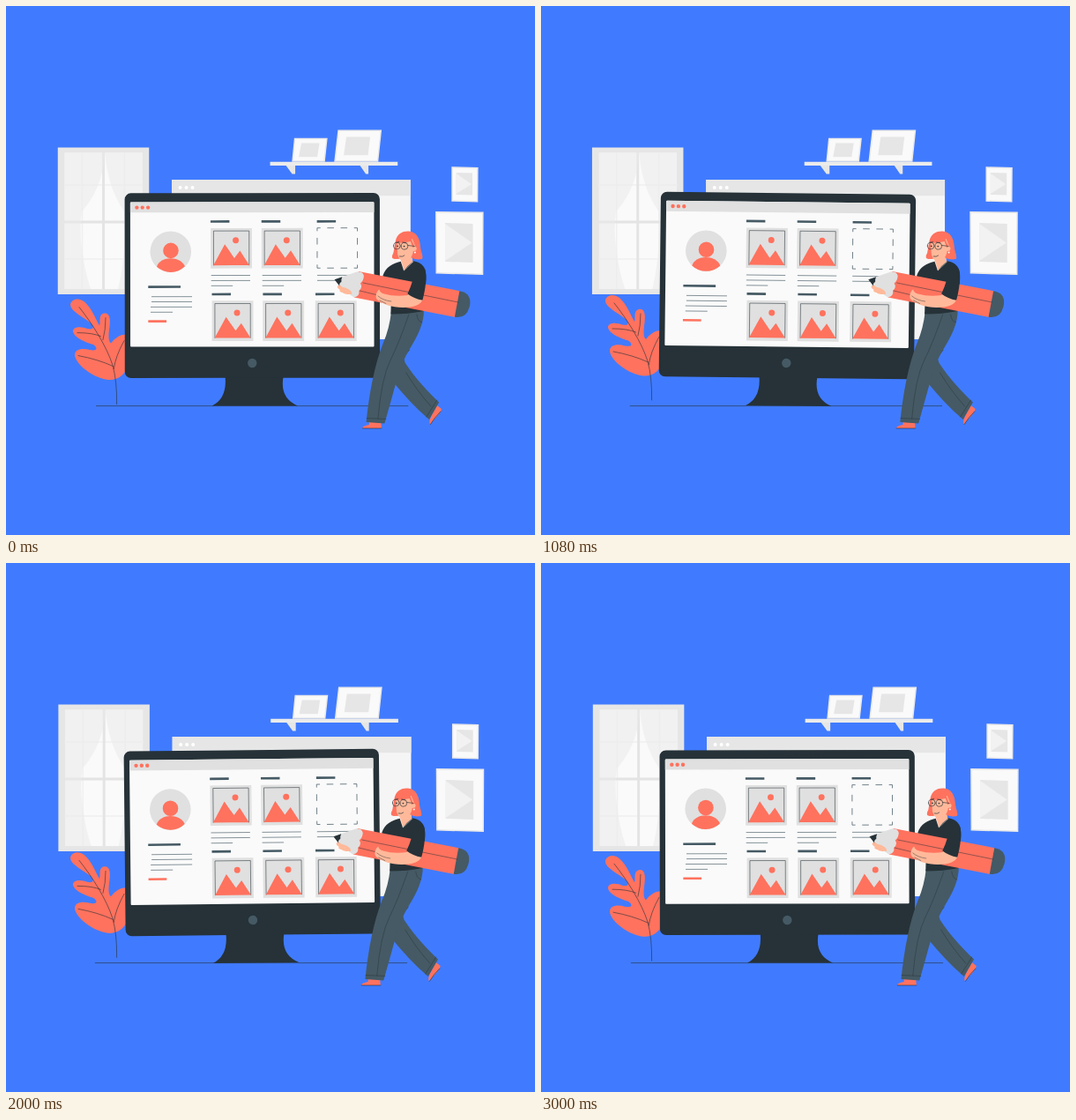
These frames come from a looping animation (600x600 px, 3.04 s). An HTML page:

```html
<!DOCTYPE html>
<html lang="en">
<head>
<meta charset="utf-8">
<title>Designer at work</title>
<style>
html, body { margin: 0; width: 100%; height: 100%; overflow: hidden; background: #407bff; }
svg { display: block; width: 100vw; height: 100vh; }
.coral { fill: #ff725e; }
.dark { fill: #263238; }
.slate { fill: #455a64; }
.skin { fill: #ffb99a; }
.white { fill: #fafafa; }
.pale { fill: #f2f2f2; }
.grey { fill: #e6e6e6; }
.mid { fill: #e0e0e0; }
.line { fill: none; stroke: #263238; stroke-width: .6; stroke-linecap: round; stroke-linejoin: round; }
.frame { fill: #fafafa; stroke: #e8e8e8; stroke-width: 1.5; }
</style>
</head>
<body>
<svg viewBox="0 0 600 600">
  <defs>
    <g id="card">
      <path class="mid" d="M0 0H46.8V45.7H0Z"/>
      <path class="line" style="stroke-width:.55" d="M3.3 42V3.2H43.6V42"/>
      <path class="coral" d="M3 42.2 16 18.3 26.8 34 33.2 25.5 43.8 42.2Z"/>
      <circle class="coral" cx="28.4" cy="13.8" r="3.5"/>
    </g>
  </defs>

  <g id="room">
    <path class="grey" d="M58.7 160.6H162.2V327H58.7Z"/>
    <path class="white" d="M66.5 166.5H154.5V321H66.5Z"/>
    <path d="M86.5 166V321M134.5 166V321M66 203H155M66 287H155" stroke="#f0f0f0" stroke-width="1.5"/>
    <path d="M110.5 166V321M66 245H155" stroke="#e4e4e4" stroke-width="3"/>
    <path d="M66.5 166.5H112C111 193 101 217 86 233Q83 250 86 275T96 321H66.5ZM112 166.5H154.5V321H127Q137 280 134 233C121 214 114 192 112 166.5Z" fill="#ececec" opacity=".55"/>

    <path class="grey" d="M317.5 181H328V190.5H324.5ZM401.5 181H411V190.5H408Z"/>
    <path d="M299.5 176.7H444.2V181H299.5Z" fill="#ebebeb"/>
    <path class="frame" d="M327.5 150.6H363.8L361 176H325ZM377 141.2H425.2L421.5 176H373Z"/>
    <path class="grey" d="M335 155.5H355.5L353 171.2H332ZM386 148.5H413L410.5 169.3H383Z"/>

    <path class="frame" d="M506 183 534.8 183.8 534.5 221.8 506 221ZM487.8 233.8 540.8 234.2 540.5 304.3 488.2 302.8Z"/>
    <path class="grey" d="M510.5 189 529 189.6V214.5L510.5 214ZM498 246 529.5 247V291L498 290Z"/>
    <path class="pale" d="M510.5 190 528 202 510.5 213ZM498 247 528.5 268.5 498 289Z"/>

    <path d="M188 197H458.8V378H188Z" fill="#f5f5f5"/>
    <path class="grey" d="M188 197H458.8V215.3H188Z"/>
    <path d="M197.5 206h0M204.5 206h0M211.5 206h0" stroke="#fff" stroke-width="4" stroke-linecap="round"/>
  </g>

  <path id="ground" class="line" d="M102.5 453.6H456"/>

  <g id="leaf">
    <path class="coral" d="M73 339C74 333 82 330.5 89 336C98 344 101 355 106 363C108 360 104 351 111 349C118 348 118.5 356 117.5 364C116 374 116 381 119 383C123 378 128 373 137 373L140 405C136 418 128 425 116 424.5C100 423 80 408 78 397C77.5 389 87 388 95 390.5C103 392 105 389 99 384.5C90 382 76 376 76 369C77 363.5 86 364 92 366.5C99 368 101 365 96 360C88 353 73 347 73 339Z"/>
    <path class="line" d="M83 342C98 361 114 386 121 408Q126 426 125.6 452M81 371Q98 371 107.5 375M113 354Q113 368 110 379M82 397Q104 401 121.5 409M134 380Q124 398 122.3 412"/>
  </g>

  <g id="monitor">
    <path class="dark" d="M248.5 420Q251 445 233.5 453.5H331Q310 445 314.5 420Z"/>
    <rect class="dark" x="134.7" y="212.2" width="289.3" height="209.6" rx="7"/>
    <rect class="white" x="141" y="222.3" width="276.5" height="164.2" rx="1"/>
    <path class="mid" d="M141 234.2V223.3Q141 222.3 142 222.3H416.5Q417.5 222.3 417.5 223.3V234.2Z"/>
    <path d="M148.5 228.5h0M154.8 228.5h0M161.2 228.5h0" stroke="#ff725e" stroke-width="4.4" stroke-linecap="round"/>
    <circle class="slate" cx="279.2" cy="405" r="5.2"/>

    <circle class="mid" cx="186.8" cy="278.7" r="23.3"/>
    <circle class="coral" cx="187" cy="277.3" r="8.8"/>
    <path class="coral" d="M171 295.6C175 283 198 283 203 295.3A23.3 23.3 0 0 1 171 295.6Z"/>
    <path d="M161.3 318.5h36.7M232 244.4h21.5M289.8 244.4h21.5M352.7 244.4h21.5M233.5 326.9h21.5M291.4 326.9h21.5M351 326.9h21.5" stroke="#455a64" stroke-width="2.6"/>
    <path d="M161.3 357.5h20.7" stroke="#ff725e" stroke-width="2.6"/>
    <path d="M165 329.6h46M165 335.4h46M164 341.3h47M164 347.2h25M232.7 305.5h44.3M232.7 311.4h44.3M232.7 317.3h24.5M290.7 305.5h44.3M290.7 311.4h44.3M290.7 317.3h24.5M353 305.5h44M353 311.4h44" stroke="#455a64" stroke-width=".65"/>
    <path d="M353 251.8H398.6V297.3H353Z" fill="none" stroke="#455a64" stroke-width=".75" stroke-dasharray="3.8 7.6 7.6 7.6 7.6 7.6 3.8 0"/>
    <use href="#card" x="232.2" y="251.9"/>
    <use href="#card" x="289.9" y="251.9"/>
    <use href="#card" x="233.6" y="334.3"/>
    <use href="#card" x="291.3" y="334.3"/>
    <use href="#card" x="350.8" y="334.3"/>
  </g>

  <g id="person">
    <path class="coral" d="M489 453 494 457C493 463 486 467 481.5 474.5Q479 473 482.5 465ZM412 472H425.5L426 479H404.5Q404 476.5 412 475Z"/>
    <path class="line" d="M404.5 479H426M481.5 474.5Q486 467 493 460"/>
    <path class="slate" d="M444 378 453 405C464 422 479 438 491.3 449.5L480 469C465 456 451 441 438 425Z"/>
    <path d="M458 390 446 405 440 427 437 424 444 385Z" fill="#2f3f48"/>
    <path class="slate" d="M437 347 474 344C474.5 360 467 374 458 389C446 408 441 435 429.5 473.5L408.7 472C412 440 418 407 428 382Q435 366 437 347Z"/>
    <path class="line" style="stroke-width:.45" d="M457 350Q446 382 436 402T422 468M409.3 467.5 431 468.5M454 416Q466 436 482 454M477 466 489 447M466 350Q467 358 472 359"/>

    <path class="dark" d="M449 289.5C438 292 431 296 427.5 306L437 330 436.5 349.5Q456 349.5 474 346L473 332C476 321 478 306 475.5 299C473 292 467 290 461 289Z"/>
    <path class="skin" d="M448 283 460 279 461.5 290Q456 294 451.5 300L448 290Z"/>
    <path class="line" style="stroke:#fafafa;stroke-width:.5" d="M448.5 290 451.5 300 462 290"/>
    <path class="coral" d="M442 266C444 258 450 255 457 255.5C466 256 469.5 264 470 272C470.4 279 474 284 472 287Q464 288.5 459 285L441 287Q436 286 439.5 280Z"/>
    <path class="skin" d="M444 266Q454 269 461 264L464.5 273Q467 274 465 277.5L462 278C461 285 457 290 451 289.5C444 288 442.5 279 444 266Z"/>
    <path class="coral" d="M442.5 269C443 260 450 257 458 260L463.5 273 461.5 274 459 267Q451 269 442.5 269ZM444 276Q443 283 446 287L438 286Z"/>
    <path class="line" style="stroke-width:.65" d="M439.7 272a3.8 3.8 0 1 0 7.6 0a3.8 3.8 0 1 0-7.6 0M448.2 272.3a3.9 3.9 0 1 0 7.8 0a3.9 3.9 0 1 0-7.8 0M456 271.5 463.5 272.5M446.5 284Q450 285 452 283M442.8 268.2l3-.8M450 268l4 .7"/>
    <path d="M444.2 272.3h0M451.7 272.5h0" stroke="#263238" stroke-width="1.7" stroke-linecap="round"/>
    <circle cx="464" cy="279.5" r="1" fill="#fafafa"/>

    <path class="skin" d="M377 317Q374 319 379 322Q377 324 382 325Q384 327.5 393 327L404 332 406 320 390 313Z"/>
    <path class="coral" d="M400 301 515 323.3 510 353 395 330.5Z"/>
    <path class="slate" d="M514.5 323.2C526 325 528 333 525.7 341.5Q522 355 509 352.8Z"/>
    <path class="mid" d="M372.7 310.3 398 301.6Q405 301 406 306Q406 311 402 314.5Q405 319 400.5 323Q401.5 329 395 330.5L391 328Z"/>
    <path class="dark" d="M372.7 310.3 381.5 307.2Q380 310 380.5 313Q377.5 314.5 378.5 317.8Z"/>
    <path class="line" style="stroke-width:.5" d="M405 314 513 336M401.5 323 422 328"/>
    <path class="skin" d="M379 319Q384 318 391 323Q394 327 391 327L380 324Q384 324 386 323Z"/>
    <path class="skin" d="M456 326 473 333C470 339 463 342 450 342C438 342 427 338 421 333C418 329 421 323 423.5 321.5Q424 325 429 326.5Q441 330 456 328Z"/>
    <path class="line" style="stroke-width:.45" d="M422 329Q428 334 437 335M424 334 431 337.5"/>
    <path class="dark" d="M463 299Q463 311 455.5 326.5Q463 332 472.5 333.8C476 321 478 306 475 298Z"/>
  </g>
</svg>
<script>
const LOOP = 3040, START = 40;
const part = id => document.getElementById(id);
const move = (id, value) => part(id).setAttribute('transform', value);

// Triangle wave: 0, 1, 0, -1 over one loop.
function wave(phase) {
  const p = ((phase + .25) % 1 + 1) % 1;
  return 1 - Math.abs(4 * p - 2);
}

function draw(now) {
  const sway = wave((now % LOOP - START) / LOOP);
  const lift = Math.abs(sway);
  move('room', `translate(${-1.2 * sway} 0)`);
  move('monitor', `rotate(${sway} 279.2 325)`);
  move('leaf', `translate(0 ${-8 * lift})`);
  for (const id of ['person', 'ground']) move(id, `translate(${-2.2 * lift} 0)`);
  requestAnimationFrame(draw);
}

requestAnimationFrame(draw);
</script>
</body>
</html>
```
